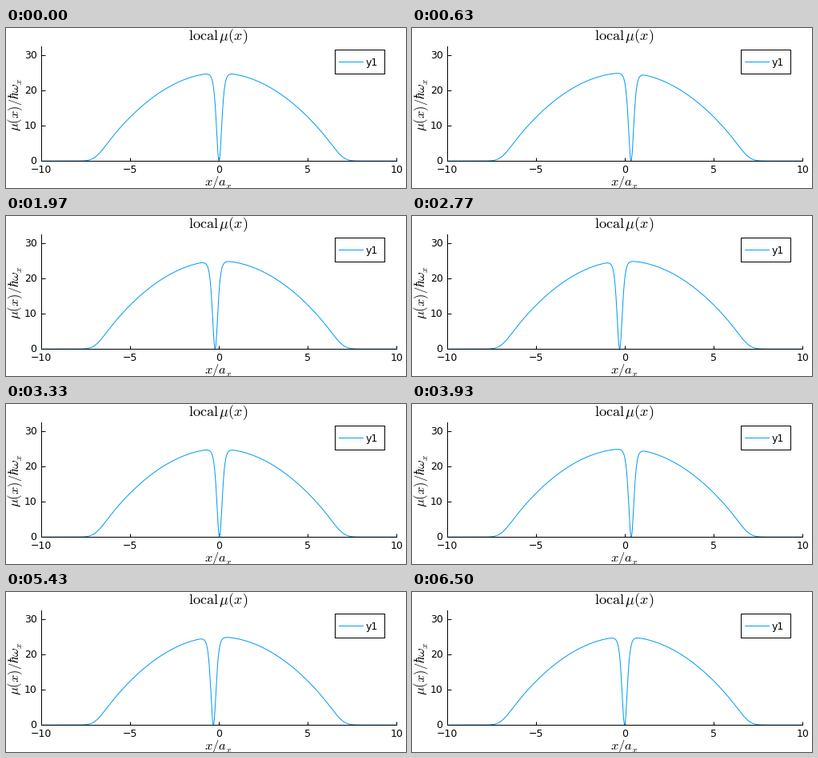
Write a matplotlib script that moves like this. It is 500 by 200 pixels and loops after 6.53 s.

```python
import numpy as np
import matplotlib.pyplot as plt
from matplotlib.animation import FuncAnimation
from matplotlib.lines import Line2D
from matplotlib.patches import Rectangle

W, H, DPI = 500, 200, 100
FRAMES, LOOP = 196, 6530
PERIOD, AMPLITUDE = FRAMES / 2, 0.371   # soliton oscillation: frames, trap lengths
MU = 25.0
PX = 72 / DPI                           # one pixel in points
BLUE = "#009af9"

plt.rcParams.update({
    "font.family": "DejaVu Sans",
    "mathtext.fontset": "cm",
})


def ground_state(x, mu):
    """Density of a trapped condensate, by Newton steps on the stationary GPE."""
    n, dx = len(x), x[1] - x[0]
    kinetic = (np.eye(n) - 0.5 * (np.eye(n, k=1) + np.eye(n, k=-1))) / dx**2
    excess = 0.5 * x**2 - mu
    psi = np.sqrt(1.1 * np.logaddexp(0, -excess / 1.1))
    for _ in range(12):
        residual = kinetic @ psi + (excess + psi**2) * psi
        psi -= np.linalg.solve(kinetic + np.diag(excess + 3 * psi**2), residual)
    return psi**2


grid = np.linspace(-10, 10, 501)
x = np.linspace(-10, 10, 1601)
background = np.interp(x, grid, ground_state(grid, MU))


def local_mu(k):
    x0 = AMPLITUDE * np.sin(2 * np.pi * k / PERIOD)
    return background * np.tanh(np.sqrt(MU) * (x - x0)) ** 2


fig = plt.figure(figsize=(W / DPI, H / DPI), dpi=DPI, facecolor="white")


def label(px, py, text, size, **kw):
    kw = {"ha": "center", "va": "center", **kw}
    fig.text(px / W, 1 - py / H, text, fontsize=size * PX, **kw)


left, right, top, bottom = 44.3, 488.3, 23, 166.2
ax = fig.add_axes([left / W, 1 - bottom / H, (right - left) / W, (bottom - top) / H])
ax.set(xlim=(-10, 10), ylim=(0, 1.3 * MU),
       xticks=[-10, -5, 0, 5, 10], yticks=[0, 10, 20, 30])
ax.spines[["top", "right"]].set_visible(False)
ax.spines[["left", "bottom"]].set_linewidth(PX)
ax.tick_params(direction="in", length=4.5 * PX, width=PX,
               labelbottom=False, labelleft=False)

for v in (-10, -5, 0, 5, 10):
    label(left + (v + 10) * (right - left) / 20, 177.3,
          f"{v}".replace("-", "\u2212"), 12.5)
for v in (0, 10, 20, 30):
    label(38.6, bottom - v * (bottom - top) / (1.3 * MU), f"{v}", 12.5, ha="right")

# the empty superscript lowers the index
label(265.6, 10.5, r"$\mathrm{local}\,\mu(x)$", 18.2)
label(265.6, 194, r"$x/a_x^{\,}$", 16.5)
label(12, 96, r"$\mu(x)/\hbar\omega_x^{\,}$", 16.5, rotation=90)

# legend
fig.add_artist(Rectangle((411 / W, 1 - 57 / H), 62 / W, 30 / H,
                         fc="white", ec="black", lw=PX))
fig.add_artist(Line2D([416 / W, 446 / W], [1 - 42 / H] * 2, color=BLUE, lw=PX))
label(450, 43.5, "y1", 12.5, ha="left")

curve, = ax.plot(x, local_mu(0), color=BLUE, lw=PX, zorder=3)


def update(k):
    curve.set_ydata(local_mu(k))
    return curve,


anim = FuncAnimation(fig, update, frames=FRAMES, interval=LOOP / FRAMES,
                     init_func=lambda: update(0), repeat=True, repeat_delay=0)
plt.show()
```
